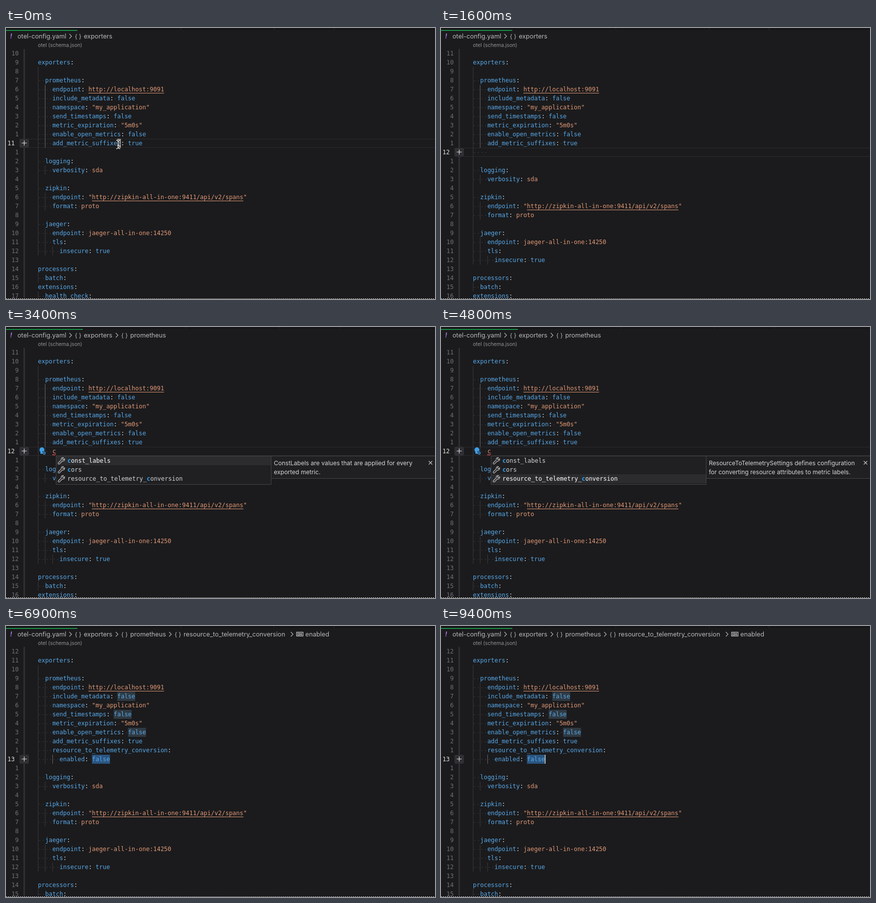
An HTML page with a canvas for the animation above (9.5 s loop, 860x543 px).

```html
<!DOCTYPE html>
<html lang="en">
<head>
<meta charset="utf-8">
<title>YAML completion</title>
<style>
html, body { margin: 0; width: 100%; height: 100%; overflow: hidden; background: #1b1b1d; }
canvas { display: block; }
</style>
</head>
<body>
<canvas id="stage" width="860" height="543"></canvas>
<script>
const ctx = document.getElementById('stage').getContext('2d');
const LOOP = 9500, LEFT = 64, CHAR = 7.224, ROW = 18, TOP = 42, BASE = 13;
const MONO = '12px "DejaVu Sans Mono", monospace';
const UI = 'Inter, sans-serif';
const BLUE = '#58a8e8', ORANGE = '#e09876', PLAIN = '#dcdcdc';

// moments of the session, in ms
const AT = { crumb: 300, newLine: 800, leave: 1400, popup: 2100, typed: 2850,
  nested: 3100, down1: 4200, down2: 4400, accept: 5400, mark: 5700, saved: 6300 };

const head = ['', 'exporters:', '', '  prometheus:', '    endpoint: http://localhost:9091',
  '    include_metadata: false', '    namespace: "my_application"', '    send_timestamps: false',
  '    metric_expiration: "5m0s"', '    enable_open_metrics: false', '    add_metric_suffixes: true'];
const tail = ['', '  logging:', '    verbosity: sda', '', '  zipkin:',
  '    endpoint: "http://zipkin-all-in-one:9411/api/v2/spans"', '    format: proto', '',
  '  jaeger:', '    endpoint: jaeger-all-in-one:14250', '    tls:', '      insecure: true', '',
  'processors:', '  batch:', 'extensions:', '  health_check:'];
const options = ['auth', 'const_labels', 'cors', 'max_request_body_size',
  'resource_to_telemetry_conversion', 'response_headers', 'tls'];
const matches = ['const_labels', 'cors', 'resource_to_telemetry_conversion'];
const docs = [
  ['ConstLabels are values that are applied for every', 'exported metric.'],
  ['ResourceToTelemetrySettings defines configuration', 'for converting resource attributes to metric labels.']];

const colX = col => LEFT + col * CHAR;
const rowY = row => TOP + row * ROW;

function rect(x, y, w, h, color) {
  ctx.fillStyle = color;
  ctx.fillRect(x, y, w, h);
}
function text(str, x, y, color, font = MONO, align = 'left') {
  ctx.font = font;
  ctx.textAlign = align;
  ctx.fillStyle = color;
  ctx.fillText(str, x, y);
}
function stroke(path, color, width = 1) {
  ctx.strokeStyle = color;
  ctx.lineWidth = width;
  ctx.stroke(new Path2D(path));
}
function frame(x, y, w, h, fill) {
  rect(x, y, w, h, '#454547');
  rect(x + 1, y + 1, w - 2, h - 2, fill);
}

function newLines(t) {
  if (t < AT.newLine) return [];
  if (t < AT.typed) return ['    '];
  if (t < AT.accept) return ['    c'];
  return ['    resource_to_telemetry_conversion:', '      enabled: false'];
}

function drawCrumbs(t) {
  const font = `12.7px ${UI}`, color = '#b8b8ba';
  const name = (label, x) => text(label, x, 21, color, font);
  const chevron = x => stroke(`M${x - 2} 12l4.5 4.5l-4.5 4.5`, color, 1.1);
  const object = (label, x) => {
    chevron(x - 27);
    text('{ }', x - 18, 20.5, color, `11.5px ${UI}`);
    name(label, x);
  };
  const field = (label, x) => {
    chevron(x - 27);
    stroke(`M${x - 17.5} 12.5h13v7.5h-13zM${x - 15} 14.8h4v3h-4zM${x - 8} 14v5M${x - 11} 16.3h5`, color, 1.3);
    name(label, x);
  };
  text('!', 8, 21, '#a274d8', `italic bold 13px ${UI}`);
  name('otel-config.yaml', 23);
  object('exporters', 156);
  const onSuffix = t >= AT.crumb && t < AT.leave;
  if (onSuffix || t >= AT.nested) object('prometheus', 249);
  if (onSuffix) field('add_metric_suffixes', 356);
  if (t >= AT.saved) {
    object('resource_to_telemetry_conversion', 356);
    field('enabled', 600);
  }
  text('otel (schema.json)', LEFT, 38, '#939395', `10.2px ${UI}`);
}

function drawGuides(lines, current, t) {
  lines.forEach((line, row) => {
    const next = lines.slice(row).find(l => l.trim()) || '';
    const depth = next.search(/\S/) / 2;
    for (let level = 0; level < depth; level++) {
      const active = t < AT.accept ? level === 1 && row > 3 && row < 11 : level === 2 && row === current;
      rect(Math.round(colX(level * 2)), rowY(row), 1, ROW, active ? '#68686a' : '#39393b');
    }
  });
}

function drawLine(line, row, current) {
  const y = rowY(row), base = y + BASE;
  for (let col = 0; col < line.length; col++)
    if (line[col] === ' ') rect(colX(col) + 3, y + 9, 1.2, 1.2, '#505052');

  const [, indent, key, colon, value] = line.match(/^( *)(\w*)(:?) ?(.*)$/);
  const keyEnd = indent.length + key.length;
  text(key, colX(indent.length), base, colon ? BLUE : ORANGE);
  text(colon, colX(keyEnd), base, PLAIN);
  const start = keyEnd + 2;
  text(value, colX(start), base, /^(true|false)$/.test(value) ? BLUE : ORANGE);
  const link = value.match(/http[^"]*/);
  if (link) rect(colX(start + link.index), y + 16, link[0].length * CHAR, 1, ORANGE);

  const here = row === current;
  text(here ? row + 1 : Math.abs(row - current), here ? 17.5 : 25.5, base,
    here ? '#e2e2e2' : '#6e7177', MONO, 'right');
}

function drawWrench(x, y) {
  stroke(`M${x} ${y + 9}l5.8 -5.8a3.5 3.5 0 0 1 4.5 -4.5l-2.2 2.5l2 2l2.5 -2.2a3.5 3.5 0 0 1 -4.5 4.5l-5.8 5.8a1.6 1.6 0 0 1 -2.3 -2.3z`, '#c8c8ca', 1.1);
}

function drawList(items, x, selected, prefix) {
  const y = 258, plain = '#202022', marked = '#2c2c2f';
  frame(x, y, 432, items.length * ROW + 4, plain);
  rect(x + 1, y + 1 + selected * ROW, 430, ROW, marked);
  items.forEach((item, i) => {
    const base = y + 14 + i * ROW, tx = x + 23;
    drawWrench(x + 5, y + 5 + i * ROW);
    text(item, tx, base, i === selected ? '#ffffff' : '#d4d4d6');
    if (!prefix) return;
    // the match sits at the start of a word
    const at = item.startsWith(prefix) ? 0 : item.indexOf('_' + prefix) + 1;
    rect(tx + at * CHAR, base - 9, CHAR, 11, i === selected ? marked : plain);
    text(prefix, tx + at * CHAR, base, '#2f9ff0', 'bold ' + MONO);
  });
}

function drawDocs(lines) {
  frame(531, 258, 330, 46, '#202022');
  lines.forEach((line, i) => text(line, 537, 276.5 + i * ROW, '#d6d6d8', `12px ${UI}`));
  stroke('M847.5 268.5l7 7M854.5 268.5l-7 7', '#c8c8ca', 1.1);
}

function drawBulb() {
  ctx.fillStyle = '#3e9ee8';
  ctx.fill(new Path2D('M69 250a5 5 0 1 1 6 0v4h-6z'));
  rect(73, 249, 7, 7, '#1b1b1d');
  stroke('M74 252.5a2.3 2.3 0 1 0 4.6 0a2.3 2.3 0 1 0 -4.6 0', '#3e9ee8', 1.6);
}

function drawPointer() {
  const beam = 'M221 225q4 0 4 4v9q0 4 -4 4M229 225q-4 0 -4 4M225 238q0 4 4 4M223 235h4';
  stroke(beam, '#111', 3);
  stroke(beam, '#f4f4f4', 1.3);
}

function drawCursor(t, current) {
  const y = rowY(current);
  if (t < AT.newLine) {
    rect(colX(22), y, CHAR, ROW, '#a6a6a6');
    text('s', colX(22), y + BASE, '#1b1b1d');
    drawPointer();
    return;
  }
  const [since, col] = t < AT.typed ? [AT.newLine, 4] : t < AT.accept ? [AT.typed, 5] : [AT.accept, 20];
  if (Math.floor((t - since) / 500) % 2 === 0) rect(Math.round(colX(col)), y, 1.5, ROW, '#d4d4d4');
}

function draw(t) {
  const added = newLines(t);
  const lines = [...head, ...added, ...tail].slice(0, 28);
  const current = 10 + added.length;
  const lineTop = rowY(current);

  rect(0, 0, 860, 543, '#1b1b1d');
  rect(0, 0, 860, 4, '#161618');
  const shift = t >= AT.nested && t < AT.saved ? 11 : 0;
  for (const x of [350, 537, 657]) rect(x + shift, 0, 1, 4, '#28282a');
  rect(0, 4, 143 + shift, 1.5, '#18b455');
  drawCrumbs(t);

  // the current line is outlined while nothing is selected
  if (t < AT.accept)
    for (const y of [lineTop, lineTop + ROW - 1]) rect(46, y, 814, 1, '#2a2a2c');
  rect(35, TOP, 3, 500, '#303033');
  ctx.fillStyle = '#303034';
  ctx.beginPath();
  ctx.roundRect(27, lineTop, 19, ROW, 3);
  ctx.fill();
  stroke(`M31.5 ${lineTop + 8.5}h10M36.5 ${lineTop + 3.5}v10`, '#dddddd', 1.2);

  if (t >= AT.mark)
    lines.forEach((line, row) => {
      if (row !== current && line.endsWith('false'))
        rect(colX(line.length - 5), rowY(row), 5 * CHAR, ROW, '#2f3a43');
    });
  if (t >= AT.accept) rect(colX(15), lineTop, 5 * CHAR, ROW, '#2b5580');

  drawGuides(lines, current, t);
  lines.forEach((line, row) => drawLine(line, row, current));

  const typing = t >= AT.typed && t < AT.accept;
  if (typing) {
    drawBulb();
    stroke('M93 257q1.2 -3 2.4 -1t2.4 0t2.4 -1', '#f14c4c', 1.2);
  }
  drawCursor(t, current);
  if (t >= AT.popup && t < AT.typed) drawList(options, 93, 0);
  if (typing) {
    drawDocs(docs[t < AT.down2 ? 0 : 1]);
    drawList(matches, 100, t < AT.down1 ? 0 : t < AT.down2 ? 1 : 2, 'c');
  }

  rect(0, 541, 860, 2, '#1b1b1d');
  for (let x = 0; x < 860; x += 4) rect(x, 542, 2, 1, '#e6e6e6');
}

function tick() {
  draw(performance.now() % LOOP);
  requestAnimationFrame(tick);
}
tick();
</script>
</body>
</html>
```
